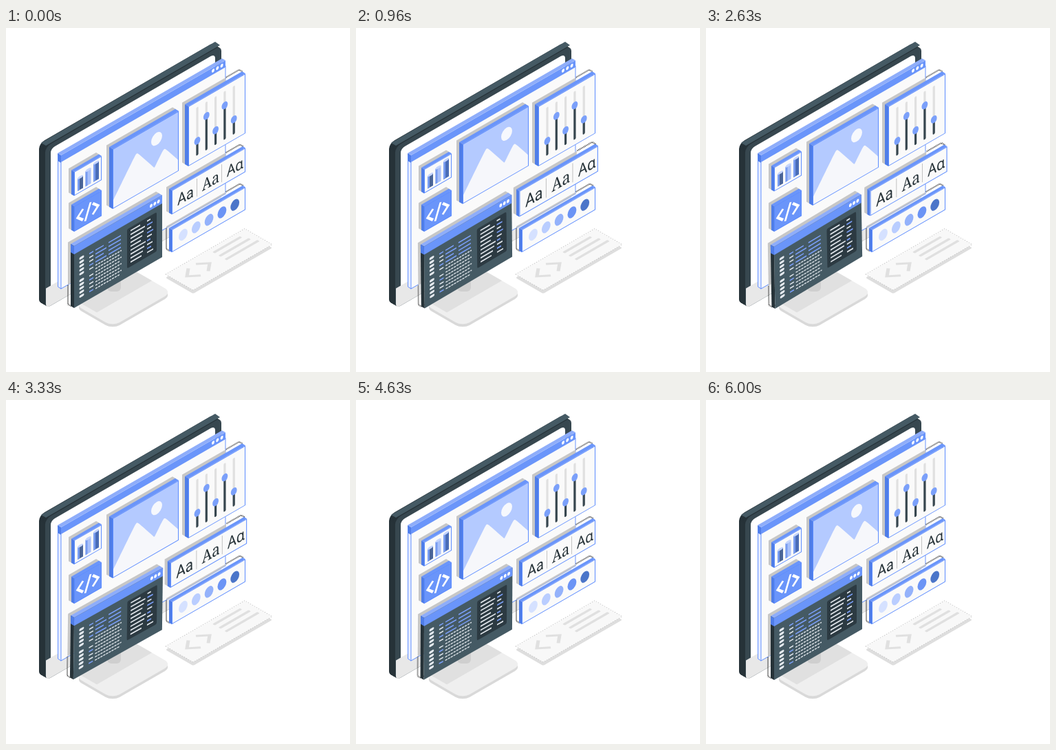
An HTML page with a canvas for the animation above (6040 ms loop, 500 by 500 pixels).

```html
<!DOCTYPE html>
<html lang="en">
<head>
<meta charset="utf-8">
<title>Design workspace</title>
<style>
  html, body { margin: 0; width: 100%; height: 100%; overflow: hidden; background: #fff; }
  canvas { display: block; width: 500px; height: 500px; }
</style>
</head>
<body>
<canvas id="stage" width="500" height="500"></canvas>
<script>
const ctx = document.getElementById('stage').getContext('2d');
const K = Math.tan(Math.PI / 6);
const LOOP = 6040, FPS = 24;
const C = {
  blue: '#6a95fa', top: '#8eadfa', side: '#4f7de8', line: '#5b8bff', paper: '#fafafa', code: '#e4e9ee',
  slate: '#455a64', dark: '#37474f', ink: '#263238', grey: '#e0e0e0', shade: '#c7c7c7'
};

function trace(pts) {
  ctx.beginPath();
  pts.forEach(p => ctx.lineTo(...p));
  ctx.closePath();
}
function poly(pts, fill) {
  trace(pts);
  ctx.fillStyle = fill;
  ctx.fill();
}
function lines(pts, color, width, cap = 'butt') {
  ctx.beginPath();
  pts.forEach(p => ctx.lineTo(...p));
  ctx.strokeStyle = color;
  ctx.lineWidth = width;
  ctx.lineCap = cap;
  ctx.stroke();
}
function oval(x, y, rx, ry, fill) {
  ctx.beginPath();
  ctx.ellipse(x, y, rx, ry, 0, 0, Math.PI * 2);
  ctx.fillStyle = fill;
  ctx.fill();
}
function rect(x, y, w, h, fill, r = 0) {
  ctx.beginPath();
  ctx.roundRect(x, y, w, h, r);
  ctx.fillStyle = fill;
  ctx.fill();
}
function dots(x, y, step) {
  for (let i = 0; i < 3; i++) oval(x + i * step, y, 2, 2.5, '#fff');
}
// '<' with its tip at x for dir 1, '>' for dir -1
function bracket(x, y, w, h, dir, color, width) {
  lines([[x + w * dir, y - h], [x, y], [x + w * dir, y + h]], color, width);
}
function skew(x, y, c, d, draw) {
  ctx.save();
  ctx.transform(1, -K, c, d, x, y);
  draw();
  ctx.restore();
}
const face = (x, y, draw) => skew(x, y, 0, 1, draw);
const floor = (x, y, draw) => skew(x, y, 1, K, draw);

// Silhouette of an upright box whose front face starts at x, y
function outline(x, y, w, h, d) {
  const r = w * K, e = d * K;
  return [[x - d, y - e], [x + w - d, y - r - e], [x + w, y - r], [x + w, y + h - r], [x, y + h], [x - d, y + h - e]];
}
function sides(x, y, w, h, d, top, side) {
  const [a, b, c, , e, f] = outline(x, y, w, h, d);
  poly([a, b, c, [x, y]], top);
  poly([a, [x, y], e, f], side);
}

const PAGE = { x: 80, y: 185, w: 239, h: 194, d: 5 };
const pageShape = outline(...Object.values(PAGE));

function shadow(x, y, w, h, d) {
  const pts = outline(x - 4, y - 2.5, w, h, d);
  ctx.save();
  trace(pageShape);
  ctx.clip();
  poly(pts, C.shade);
  ctx.restore();
  // Beyond the page the shadow is only a dotted rim
  ctx.save();
  trace(pageShape);
  ctx.rect(0, 0, 500, 500);
  ctx.clip('evenodd');
  trace(pts);
  ctx.setLineDash([1, 1]);
  ctx.strokeStyle = '#444';
  ctx.lineWidth = 2;
  ctx.stroke();
  ctx.restore();
}
function panel(x, y, w, h, d, fill, draw, look = {}) {
  shadow(x, y, w, h, d);
  sides(x, y, w, h, d, look.top || C.blue, look.side || C.side);
  face(x, y, () => {
    rect(0, 0, w, h, fill);
    draw();
    if (look.plain) return;
    ctx.strokeStyle = C.line;
    ctx.lineWidth = 1;
    ctx.strokeRect(.5, .5, w - 1, h - 1);
  });
}

function stand() {
  floor(100, 406, () => rect(0, 0, 86, 55, '#d9d9d9', 10));
  floor(100, 402, () => {
    rect(0, 0, 86, 55, '#efefef', 10);
    rect(6, 0, 80, 26, '#e0e0e0');
  });
  rect(147, 340, 20, 43, '#cfcfcf', 6);
}

function monitor() {
  const slab = (i, fill) => face(57 - i, 173 - i * K, () => rect(0, 0, 256, 235, fill, 8));
  for (let i = 9; i > 0; i--) slab(i, C.ink);
  poly([[51, 167], [304, 20], [311, 25], [58, 171]], C.slate);
  slab(0, C.dark);
  face(57, 173, () => {
    rect(8, 7, 239, 205, '#fff', 6);
    rect(1, 206, 255, 29, '#e8e8e8', [0, 0, 6, 6]);
  });
}

function page() {
  const { x, y, w, h, d } = PAGE;
  sides(x, y, w, h, d, C.top, '#e3ebff');
  poly([[x, y], [x - d, y - d * K], [x - d, y + 8], [x, y + 11]], C.side);
  face(x, y, () => {
    rect(0, 0, w, h, C.paper);
    lines([[0, 10], [0, h], [w, h], [w, 8]], C.line, .9);
    rect(0, 0, w, 10, C.blue);
    dots(221, 4.5, 6.3);
  });
  lines([[x, y + h], [x - d + .5, y + h - d * K], [x - d + .5, y]], C.line, .9);
}

function bars(dy) {
  panel(99, 209 + dy, 40, 35, 4, C.paper, () => {
    ['#496498', '#a9c1fa', '#4a6db7'].forEach((fill, i) => {
      const x = 5 + i * 11.5, h = 18 + i * 4, y = 31 - h;
      rect(x, y, 8, h, fill);
      rect(x, y, 3, h, '#789cf0');
      oval(x + 4, y, 4, 1.8, '#c5d5fd');
    });
  });
}

function codeButton() {
  panel(99, 259, 40, 37, 4, C.blue, () => {
    bracket(5, 19.5, 8, 8, 1, '#fff', 3.4);
    lines([[24, 8], [16, 31]], '#fff', 3);
    bracket(35, 19.5, 8, 8, -1, '#fff', 3.4);
  });
}

function picture(dy) {
  const w = 96, h = 87, slope = 1.47;
  panel(155, 176 + dy, w, h, 5, '#b4caff', () => {
    oval(64, 22, 8, 9, '#f6f8fd');
    const hill = [];
    for (let x = 0; x <= w; x++) {
      const rise = (peak, y) => y + slope * Math.hypot(x - peak, 1.5);
      hill.push([x, Math.min(rise(35, 24.5), rise(75, 41))]);
    }
    poly([...hill, [w, h], [0, h]], '#f6f7fb');
  });
}

function sliders() {
  panel(265, 114, 83, 87, 5, C.paper, () => {
    for (let i = 0; i < 5; i++) {
      const x = 13 + i * 13.3, y = i % 2 ? 29 : 57.5;
      const knob = i < 4 ? y : 57;
      lines([[x, 10], [x, 77]], C.grey, 3.2, 'round');
      lines([[x, knob], [x, 77]], C.dark, 3.2, 'round');
      oval(x, knob, 4.4, 5.3, '#7ba0fa');
    }
  });
}

// Draws with a transform applied around a fixed point
function about(x, y, change, draw) {
  ctx.save();
  ctx.translate(x, y);
  change();
  ctx.translate(-x, -y);
  draw();
  ctx.restore();
}

function fonts(scale) {
  const samples = [['Aa', '23px Roboto, sans-serif'], ['Aa', '23px "Noto Serif", serif'], ['A\u0251', '300 22px "Noto Sans", sans-serif']];
  about(293, 221, () => ctx.scale(scale, scale), () =>
    panel(241, 236, 107, 35, 4, C.paper, () =>
      samples.forEach(([text, font], i) => {
        if (i) rect(i * 36, 4, 1, 26, '#c4c4c4');
        ctx.save();
        ctx.translate(8 + i * 36, 27);
        ctx.scale(Math.cos(Math.PI / 6), 1);
        ctx.font = font;
        ctx.fillStyle = C.ink;
        ctx.fillText(text, 0, 0);
        ctx.restore();
      })));
}

function swatches() {
  panel(241, 293, 107, 33, 4, C.paper, () =>
    ['#d5e1ff', '#b9cdff', '#94b2fb', '#6b94f5', '#4b75c9']
      .forEach((c, i) => oval(16.5 + i * 18.8, 17, 6.4, 7.8, c)));
}

function editorText() {
  const tint = blue => blue ? '#7da2ff' : C.code;
  for (let i = 0; i < 10; i++) {
    const y = 23 + i * 5.7 + (i > 4 ? 4 : 0);
    rect(7.5, y - 1.8, 7, 3.6, C.code, 1.8);
    rect(22, y, 6, 1.7, tint(i % 3 === 0));
    if (i < 4) {
      rect(31, y, 12 + i % 2 * 4, 1.7, tint(true));
      rect(50, y, 18, 1.7, tint(true));
    }
  }
  ctx.save();
  ctx.setLineDash([3, 1]);
  for (let i = 0; i < 8; i++) lines([[31, 46 + i * 4.8], [69 - i % 2 * 3, 46 + i * 4.8]], C.code, 1.5);
  ctx.restore();
  rect(77, 20, 43, 57, '#2c3a42', 2);
  for (let i = 0; i < 9; i++) {
    const y = 24 + i * 5.7;
    rect(82, y, 14 + i * 7 % 9, 1.9, C.code);
    rect(106, y, 5 + i * 3 % 5, 1.9, tint(i % 2));
  }
}

function editor(angle) {
  about(160.5, 323.5, () => ctx.rotate(angle * Math.PI / 180), () => {
    panel(99, 317, 128, 90, 5, C.slate, () => {
      rect(0, 0, 128, 12, C.blue);
      dots(112, 6, 5.3);
      editorText();
    }, { top: C.top, side: C.ink, plain: true });
    poly([[94, 314], [99, 317], [99, 329], [94, 326]], C.side);
  });
}

function tablet() {
  floor(232, 363, () => rect(0, 0, 115, 40, '#dedede', 2));
  floor(232, 358, () => {
    rect(0, 0, 115, 40, '#f8f8f8', 2);
    ctx.save();
    ctx.setLineDash([1, 2]);
    ctx.strokeStyle = '#b9b9b9';
    ctx.lineWidth = .8;
    ctx.strokeRect(0, 0, 115, 40);
    ctx.restore();
    bracket(13, 18, 11, 9, 1, C.grey, 3.6);
    bracket(46, 18, 11, 9, -1, C.grey, 3.6);
    for (let i = 0; i < 3; i++) rect(62, 6 + i * 8.7, 40 + i * 4, 3.4, C.grey, 1);
  });
}

// Triangle wave, 0 at the ends of each period and 1 in the middle
const bounce = (t, period) => 1 - Math.abs(1 - 2 * (t % period) / period);
// Triangle wave from -1 to 1 that starts at 0 and rises
const sway = t => 2 * bounce(t + 375, 1500) - 1;
// One linear rise and fall around a peak
const pulse = (t, peak, rise, fall) => Math.max(0, 1 - (t < peak ? (peak - t) / rise : (t - peak) / fall));

function draw(t) {
  ctx.fillStyle = '#fff';
  ctx.fillRect(0, 0, 500, 500);
  stand();
  monitor();
  page();
  tablet();
  bars(-6.5 * bounce(t, 750));
  codeButton();
  picture(-10 * bounce(t, 1500));
  sliders();
  swatches();
  fonts(1 + .1 * (pulse(t, 600, 600, 1200) + pulse(t, 2880, 480, 680)));
  editor(sway(t));
}

const start = performance.now();
function tick(now) {
  const t = Math.max(0, now - start) % LOOP;
  draw(Math.floor(t * FPS / 1000 + .05) * 1000 / FPS);
  requestAnimationFrame(tick);
}
draw(0);
requestAnimationFrame(tick);
</script>
</body>
</html>
```
